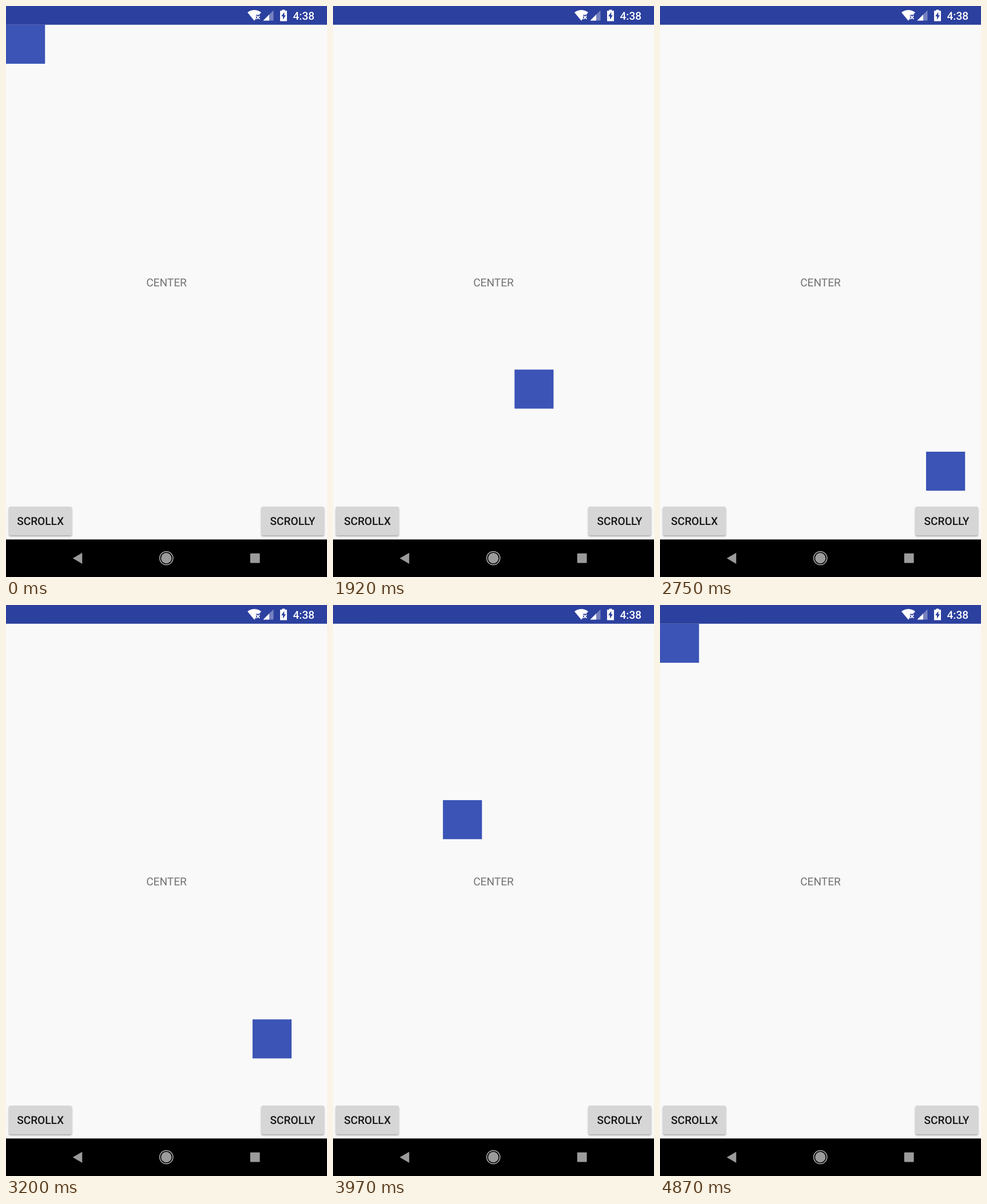
An HTML page that plays this animation: 561x998 px, repeating every 4990 ms.

```html
<!DOCTYPE html>
<html lang="en">
<head>
<meta charset="utf-8">
<title>Drag and return</title>
<style>
  html, body { margin: 0; width: 100%; height: 100%; overflow: hidden; background: #f9f9f9; }
  svg { display: block; width: 561px; height: 998px; }
  text {
    font: 500 19.1px Roboto, sans-serif; text-anchor: middle; fill: #161616;
    text-rendering: geometricPrecision;
  }
  .button { fill: #d6d6d6; filter: drop-shadow(0 2px 1.5px rgba(0, 0, 0, .32)); }
</style>
</head>
<body>
<svg viewBox="0 0 561 998">
  <rect width="561" height="998" fill="#f9f9f9"/>
  <text x="280.5" y="490.2" style="font-weight:400;fill:#727272">CENTER</text>
  <rect id="box" width="68.2" height="68.2" fill="#3b54b6"/>

  <rect class="button" x="5" y="875" width="110" height="50" rx="2.7"/>
  <text x="60.1" y="907">SCROLLX</text>
  <rect class="button" x="446.3" y="875" width="109.7" height="50" rx="2.7"/>
  <text x="501" y="907">SCROLLY</text>

  <!-- status bar -->
  <rect width="561" height="32.75" fill="#2c409f"/>
  <g fill="#fff">
    <path d="M422 11.2Q434 3 446 11.2L442.5 15.5H437V22L434 25.8Z"/>
    <path d="M437.8 17.2l5.6 5.6m0-5.6l-5.6 5.6" stroke="#fff" stroke-width="1.9"/>
    <path d="M467.5 7.5V25.5H449.5Z" opacity=".35"/>
    <path d="M460 15V25.5H449.5Z"/>
    <path d="M482.5 8.2V6.5H487.5V8.2H491V26.5H479V8.2Z"/>
  </g>
  <path d="M486.3 10.5L481.2 18H484V23.8L489 16.2H486.3Z" fill="#2c409f"/>
  <text x="520.3" y="24" style="fill:#fff">4:38</text>

  <!-- navigation bar -->
  <rect y="932.4" width="561" height="66"/>
  <g fill="#9b9b9b">
    <path d="M116.7 965.3L133.2 955.7V974.9Z"/>
    <circle cx="280.2" cy="965" r="9.2"/>
    <circle cx="280.2" cy="965" r="11.6" fill="none" stroke="#b4b4b4" stroke-width="1.5"/>
    <rect x="426.8" y="956.8" width="16.8" height="16.8" rx="1"/>
  </g>
</svg>
<script>
const LOOP = 4990, START = 1670, STEP = 64.05;
const box = document.getElementById('box');

// Turning points of the box: step, x, y
const path = [
  [-1, 0, 32.75],   // at rest
  [0, 0, 46],       // picked up
  [6, 423, 832],    // dragged down
  [8, 375, 771],
  [9, 375, 771],
  [14, 465, 779],   // held, then let go
  [18.5, 465, 779],
  [50, 0, 32.75]    // slid back
];

const ease = u => (1 - Math.cos(Math.PI * u)) / 2;

function place(step) {
  const next = path.findIndex(p => p[0] >= step);
  if (next < 1) return path[0].slice(1);
  const [s0, x0, y0] = path[next - 1], [s1, x1, y1] = path[next];
  const k = ease((step - s0) / (s1 - s0));
  return [x0 + (x1 - x0) * k, y0 + (y1 - y0) * k];
}

// The screen refreshes once per step, on a 10 ms clock
function draw(now) {
  const clock = Math.floor(now % LOOP / 10) * 10 + 9.99;
  const [x, y] = place(Math.floor((clock - START) / STEP));
  box.setAttribute('x', x);
  box.setAttribute('y', y);
}

const begin = performance.now();
function tick() {
  draw(performance.now() - begin);
  requestAnimationFrame(tick);
}
tick();
</script>
</body>
</html>
```
